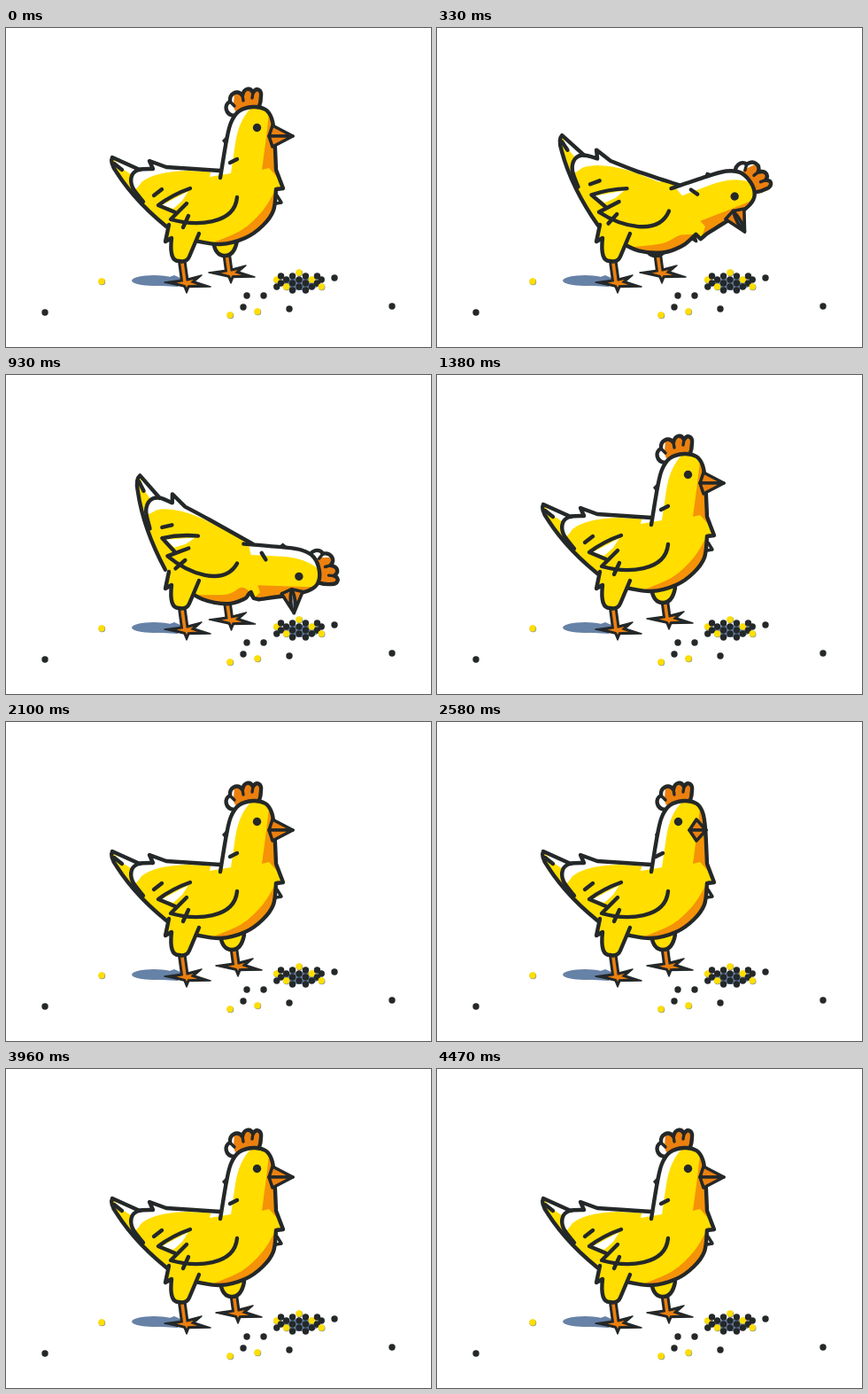
Animation of 480 by 360 pixels, one loop 4.5 s. Source, as an HTML page with a canvas:

```html
<!DOCTYPE html>
<html lang="en">
<head>
<meta charset="utf-8">
<title>Pecking hen</title>
<style>
html, body { margin: 0; width: 100%; height: 100%; overflow: hidden; background: #fff; }
canvas { display: block; width: 480px; height: 360px; }
</style>
</head>
<body>
<canvas id="stage" width="480" height="360"></canvas>
<script>
const ctx = document.getElementById('stage').getContext('2d');
const LOOP = 4500;
const INK = '#242829', YELLOW = '#ffde00', ORANGE = '#f59208', RUST = '#ec800f', WHITE = '#fff', BLUE = '#6782a7';

// The hen bends at two joints; the neck blends between them.
const HIP = { x: 211, y: 202, swing: 26 * Math.PI / 180 };
const NECK = { x: 244, y: 196, swing: Math.PI / 2 };

// Key points of the standing silhouette; a third value marks a sharp corner.
const rump = [
  [155, 196], [143, 180], [142, 167], [150, 160], [166, 159, 1], [162, 150, 1], [181, 157, 1],
  [212, 159], [242, 161]
];
const front = [
  [242, 169, 1], [249, 127], [254, 107], [263, 94], [279, 89], [293, 92], [300, 102], [303, 120],
  [305, 160, 1], [313, 181, 1], [305, 182, 1], [302, 206], [290, 223], [270, 237], [242, 244], [213, 240]
];
const breast = [[307, 178, 1], [290, 206], [266, 228], [232, 243, 1], [275, 260, 1], [325, 220, 1]];
const notch = [[306, 189, 1], [311, 197, 1], [305, 198, 1]];

const tail = new Path2D('M151 160L120 146Q117 152 125 163Q148 199 190 231');
const tailWhite = new Path2D('M120 146L151 160L144 167L130 158Z');
const rumpWhite = new Path2D('M130 192Q144 188 153 174Q168 162 205 161L242 163L230 140L135 140Z');
const feather = new Path2D('M208 181Q188 188 172 200L191 208');
const featherWhite = new Path2D('M206 184L176 200L189 204L199 195Z');
const wing = new Path2D('M204 198L186 216C215 224 258 222 261 191');
const dashes = new Path2D('M167 189L176 182M206 212L200 225M122 153L131 160');
const neckWhite = new Path2D('M230 168L254 164L259 130Q263 103 278 89L250 80Z');
const neckOrange = new Path2D('M298 88Q294 125 289 160L297 158L306 168L330 160L315 88Z');
const comb = new Path2D('M258 99C247 98 246 86 253 83C252 74 261 69 267 76C269 67 276 67 279 73C283 66 289 70 288 77Q288 84 285 91');
const combWhite = new Path2D('M258 99C247 98 246 86 253 83C252 78 254 75 258 73L257 86Q257 92 261 96Z');
const creases = new Path2D('M253 83L258 88M267 76L268 82M279 73L278 79');
const thigh = new Path2D('M184 222L180 241L187 237Q184 263 195 263Q204 265 207 258L218 232');
const backThigh = new Path2D('M234 240Q236 257 247 257Q258 257 261 240');

const TOES = [[-25, -1], [27, 4], [17, -9], [0, 11]];
const looseBlack = [[44, 321], [272, 302], [291, 302], [268, 315], [320, 317], [371, 282], [436, 314]];
const looseYellow = [[108, 286], [253, 324], [284, 320]];

const mix = (a, b, k) => a + (b - a) * k;
const clamp = k => Math.min(1, Math.max(0, k));
function ease(t, from, to) {
  const k = clamp((t - from) / (to - from));
  return k * k * (3 - 2 * k);
}

function fill(path, color) {
  ctx.fillStyle = color;
  ctx.fill(path);
}
function stroke(path, width = 4.4, color = INK) {
  ctx.lineWidth = width;
  ctx.strokeStyle = color;
  ctx.stroke(path);
}
function ellipse(x, y, rx, ry, color) {
  const path = new Path2D();
  path.ellipse(x, y, rx, ry, 0, 0, 2 * Math.PI);
  fill(path, color);
}

function swung(x, y, joint, bend) {
  const c = Math.cos(joint.swing * bend), s = Math.sin(joint.swing * bend);
  const dx = x - joint.x, dy = y - joint.y;
  return [joint.x + dx * c - dy * s, joint.y + dx * s + dy * c];
}
function posed(points, bend) {
  return points.map(([x, y, corner]) => {
    const weight = clamp((230 - y) / 70) * clamp((x - 215) / 25);
    const body = swung(x, y, HIP, bend), head = swung(x, y, NECK, bend);
    return [mix(body[0], head[0], weight), mix(body[1], head[1], weight), corner];
  });
}
function inJoint(joint, bend, paint) {
  ctx.save();
  ctx.translate(joint.x, joint.y);
  ctx.rotate(joint.swing * bend);
  ctx.translate(-joint.x, -joint.y);
  paint();
  ctx.restore();
}

// Catmull-Rom curve that breaks at corners.
function curve(points, path = new Path2D()) {
  path.lineTo(points[0][0], points[0][1]);
  for (let i = 0; i < points.length - 1; i++) {
    const b = points[i], c = points[i + 1];
    const a = b[2] || !i ? b : points[i - 1];
    const d = c[2] || i + 2 >= points.length ? c : points[i + 2];
    path.bezierCurveTo(
      b[0] + (c[0] - a[0]) / 6, b[1] + (c[1] - a[1]) / 6,
      c[0] - (d[0] - b[0]) / 6, c[1] - (d[1] - b[1]) / 6, c[0], c[1]);
  }
  return path;
}

function star(reach, width, color) {
  for (const [x, y] of TOES) {
    const side = width / Math.hypot(x, y);
    const toe = new Path2D();
    toe.moveTo(-y * side, x * side);
    toe.lineTo(x * reach, y * reach);
    toe.lineTo(y * side, -x * side);
    toe.closePath();
    fill(toe, color);
    if (color === INK) stroke(toe, 1.5);
  }
}
function leg(x, y) {
  const shin = new Path2D('M-5 -23L-2 -1');
  ctx.save();
  ctx.translate(x, y);
  stroke(shin, 9.5);
  star(1, 4.5, INK);
  stroke(shin, 3.6, RUST);
  star(0.45, 2.4, RUST);
  ctx.restore();
}
function backLeg(step) {
  leg(mix(254, 262, step), mix(277, 276, step));
  ctx.save();
  ctx.translate(8 * step, 0);
  fill(backThigh, YELLOW);
  stroke(backThigh);
  ctx.restore();
}

function crest(bend) {
  ctx.save();
  ctx.translate(8 * bend, 0);
  ctx.save();
  ctx.translate(2, 0);
  fill(comb, RUST);
  ctx.restore();
  fill(comb, RUST);
  fill(combWhite, WHITE);
  stroke(comb);
  stroke(creases, 3.4);
  ctx.restore();
}

function face(bend, turn) {
  const hinge = mix(297, 285, turn), edge = mix(301, 293, turn), tip = mix(324, 304, turn);
  const gap = 6 * bend;
  fill(new Path2D(`M${hinge} 122L${edge + 3} 115L${tip} 122L${edge + 3} 129Z`), '#777d82');
  for (const side of [-1, 1]) {
    const half = new Path2D(
      `M${hinge} 122L${edge} ${122 + 12 * side}L${tip} 122Q${hinge + 15} ${122 + gap * side} ${hinge} 122Z`);
    fill(half, RUST);
    stroke(half, 3.6);
  }
  ellipse(283.5 - 11 * turn, 112.5, 4.7, 4.7, INK);
  const shift = -6 * turn;
  stroke(new Path2D(`M${253 + shift} 152L${261 + shift} 148`));
  fill(new Path2D(`M251 120L${244 + 2 * turn} 127L249 134Z`), INK);
}

function hen(bend, turn) {
  const rumpNow = posed(rump, bend), frontNow = posed(front, bend);
  const silhouette = curve(frontNow, curve(rumpNow));
  const [hipX, hipY] = swung(188, 229, HIP, bend);
  silhouette.lineTo(hipX, hipY);
  silhouette.closePath();

  inJoint(HIP, bend, () => {
    fill(tail, YELLOW);
    fill(tailWhite, WHITE);
  });
  inJoint(NECK, bend, () => crest(bend));

  ctx.save();
  fill(silhouette, YELLOW);
  ctx.clip(silhouette);
  inJoint(HIP, bend, () => fill(rumpWhite, WHITE));
  inJoint(NECK, bend, () => {
    fill(neckWhite, WHITE);
    fill(neckOrange, ORANGE);
  });
  fill(curve(posed(breast, bend)), ORANGE);
  ctx.restore();

  inJoint(HIP, bend, () => stroke(tail));
  stroke(curve(rumpNow));
  stroke(curve(frontNow));
  stroke(curve(posed(notch, bend)), 3.5);
  leg(204, 288);
  fill(thigh, YELLOW);
  stroke(thigh);
  inJoint(HIP, bend, () => {
    fill(featherWhite, WHITE);
    [feather, wing, dashes].forEach(path => stroke(path));
  });
  inJoint(NECK, bend, () => face(bend, turn));
}

function seed(x, y, yellow) {
  if (yellow) ellipse(x + 0.4, y + 0.5, 3.8, 3.8, BLUE);
  ellipse(x, y, 3.7, 3.7, yellow ? YELLOW : INK);
}

// Honeycomb heap, cut to an oval and narrowing toward its ends.
function heap() {
  ellipse(333, 289, 21, 7, BLUE);
  for (let col = -4; col <= 4; col++) {
    for (let row = -1; row <= 1; row++) {
      const x = 331 + 30 * Math.sin(col / 4);
      const y = 284 + 8 * row + (col % 2 ? 4 : 0);
      if (Math.hypot((x - 331) / 30, (y - 286) / 11.3) > 1) continue;
      seed(x, y, (col - 2 * row + 12) % 6 === 2);
    }
  }
}

function draw(t) {
  const rise = ease(t, 880, 1220);
  const bend = ease(t, 120, 460) - rise;
  const turn = ease(t, 2250, 2400) - ease(t, 3780, 3930);
  ctx.fillStyle = WHITE;
  ctx.fillRect(0, 0, 480, 360);
  ctx.lineCap = ctx.lineJoin = 'round';
  ellipse(167, 285, 25, 6, BLUE);
  fill(new Path2D('M160 290L190 279L199 283L194 292Z'), BLUE);
  backLeg(rise);
  heap();
  looseBlack.forEach(([x, y]) => seed(x, y, false));
  looseYellow.forEach(([x, y]) => seed(x, y, true));
  hen(bend, turn);
}

const start = performance.now();
function frame() {
  draw((performance.now() - start) % LOOP);
  requestAnimationFrame(frame);
}
frame();
</script>
</body>
</html>
```
